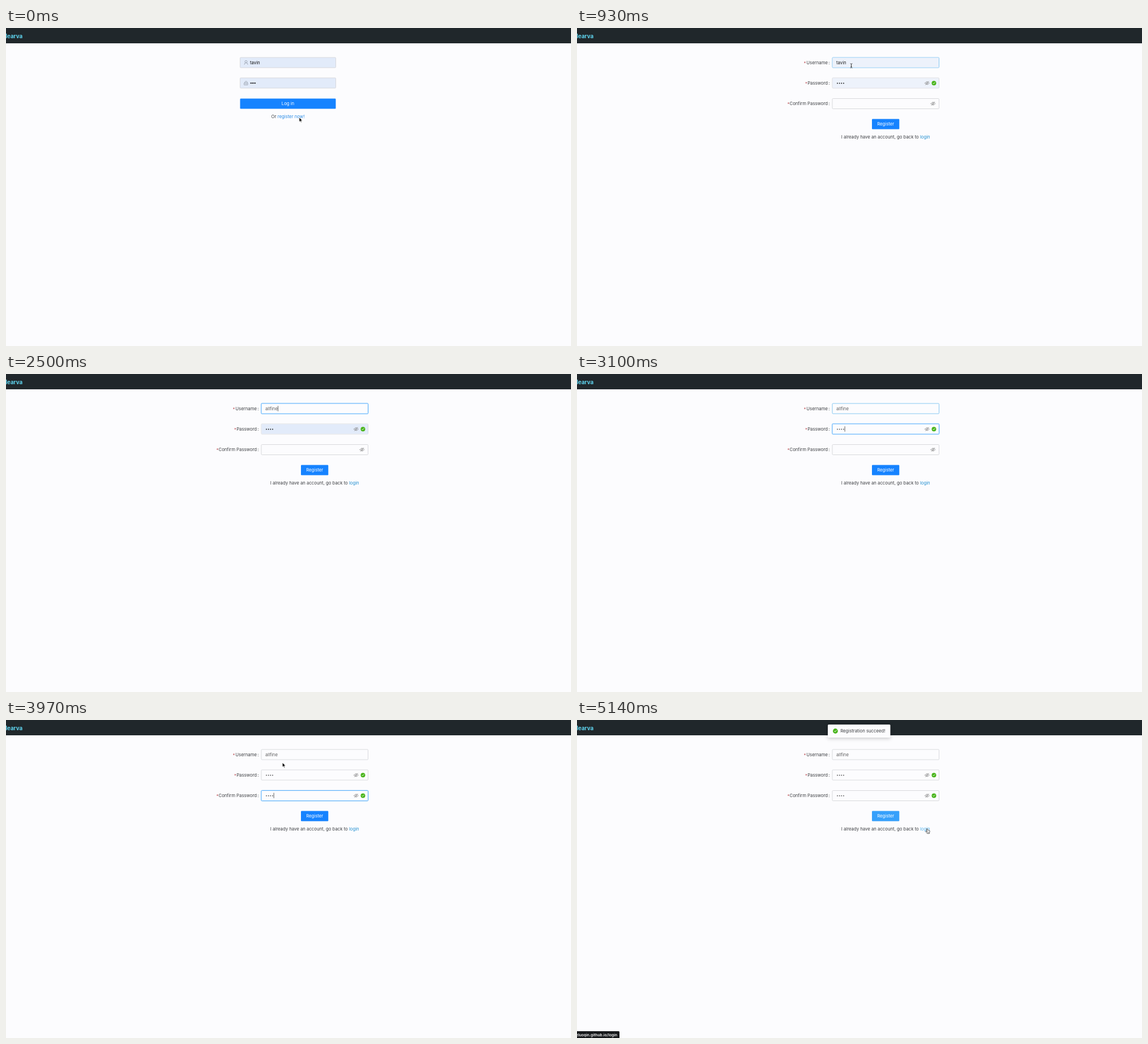
An HTML page for the animation above (5.27 s loop, 998 px wide and 561 px high).

```html
<!DOCTYPE html>
<html lang="en">
<head>
<meta charset="utf-8">
<title>Sign-up demo</title>
<style>
  html, body { margin: 0; width: 100%; height: 100%; overflow: hidden; background: #fcfcfe; }
  svg { display: block; width: 998px; height: 561px; font: 7.75px Inter, Roboto, sans-serif; }
</style>
</head>
<body>
<svg id="stage" viewBox="0 0 998 561"></svg>
<script>
const LOOP = 5270;
const BLUE = '#1683ff', LIGHT_BLUE = '#36a0fb', GREEN = '#48b41a', RED = '#ee1f2d', INK = '#3d3f42';
const AUTOFILL = '#e2ebfa', LINE = '#d0d1d5';
const stage = document.getElementById('stage');
const measure = document.createElement('canvas').getContext('2d');
measure.font = '7.75px Inter, Roboto, sans-serif';

const OLD_USER = 'tavin', NEW_USER = 'allfine';
const PAGE_SWITCH = 680, SELECT = 1400, TYPE_USER = 1850, FOCUS_PASS = 2640, TYPE_PASS = 2760,
      FOCUS_CONFIRM = 3200, TYPE_CONFIRM = 3350, MATCH = 3700, CLICK = 4280;

const clamp = v => Math.max(0, Math.min(1, v));
const progress = (t, from, to) => clamp((t - from) / (to - from));
const ease = p => p * p * (3 - 2 * p);
const typed = (t, start, step, max) => Math.max(0, Math.min(max, Math.floor((t - start) / step) + 1));

const text = (x, y, str, attrs = '') => `<text x="${x}" y="${y}" fill="${INK}" ${attrs}>${str}</text>`;
const box = (x, y, w, h, fill, stroke = 'none', r = 1.3) =>
  `<rect x="${x}" y="${y}" width="${w}" height="${h}" rx="${r}" fill="${fill}" stroke="${stroke}" stroke-width=".8"/>`;
const path = (d, stroke, width = .8, fill = 'none') =>
  `<path d="${d}" fill="${fill}" stroke="${stroke}" stroke-width="${width}" stroke-linejoin="round" stroke-linecap="round"/>`;
const at = (x, y, content, attrs = '') => `<g transform="translate(${x} ${y})" ${attrs}>${content}</g>`;
const dots = (x, y, n, step, r, fill) =>
  Array.from({ length: n }, (_, i) => `<circle cx="${x + i * step}" cy="${y}" r="${r}" fill="${fill}"/>`).join('');
const caret = (x, y) => path(`M${x} ${y - 4.3}V${y + 4.3}`, '#222', .7);

function input(x, y, w, { fill = '#fcfcfe', border = LINE, ring } = {}) {
  const glow = ring ? box(x - .7, y - .7, w + 1.4, 19.4, 'none', ring, 2) : '';
  return glow + box(x, y, w, 18, fill, border);
}

function badge(x, y, ok, scale = 1) {
  const mark = ok ? 'M-1.7 .1L-.5 1.4L1.8-1.4' : 'M-1.3-1.3L1.3 1.3M1.3-1.3L-1.3 1.3';
  return at(x, y, `<g transform="scale(${scale})"><circle r="4" fill="${ok ? GREEN : RED}"/>${path(mark, '#fff')}</g>`);
}

const hiddenEye = (x, y) => at(x, y,
  path('M-3.8 0Q0-5.4 3.8 0Q0 5.4-3.8 0ZM-2.9 3.1L2.9-3.1', '#858585', .75) +
  '<circle r="1.3" fill="none" stroke="#858585" stroke-width=".7"/>');

const cursors = {
  arrow: path('M0 0V7.5L1.8 5.9L3 8.6L4.2 8.1L3 5.4H5.4Z', '#fff', .6, '#000'),
  beam: path('M-1.5-3.6Q0-3.6 0-2.6Q0-3.6 1.5-3.6M0-2.6V2.8M-1.5 3.8Q0 3.8 0 2.8Q0 3.8 1.5 3.8M-.8 1H.8', '#222', .8),
  hand: path('M-1.5-4Q-.6-4.8 0-3.9L.5-1.6L1.5-1.8L2.2-1.3L3.2-1.3L4-.6Q4.5 1.2 3.5 2.8V4.2H-.4L-2.8 1.1Q-3.4 0-2.3-.1L-1 .8Z', '#222', .75, '#fff') +
    path('M.6 1.2V2.8M1.9 1.2V2.8', '#222', .45)
};

function pointer(t) {
  if (t < 100) return at(518, 158, cursors.arrow);
  if (t < PAGE_SWITCH) return at(519, 161, cursors.hand);
  if (t < 1800) {
    const p = ease(progress(t, PAGE_SWITCH, 920));
    return at(519 - 34.5 * p, 161 - 94.5 * p, p > .9 ? cursors.beam : cursors.arrow);
  }
  if (t < 3920) return '';
  if (t < 4500) {
    const p = ease(progress(t, 3920, 4200));
    const kind = p < .08 ? 'beam' : p > .92 ? 'hand' : 'arrow';
    return at(484.5 + 43.5 * p, 66.5 + 102.5 * p, cursors[kind]);
  }
  const p = ease(progress(t, 4500, 4860));
  return at(528 + 91 * p, 169 + 27 * p, p < .15 || p > .9 ? cursors.hand : cursors.arrow);
}

function loginPage(t) {
  return input(413.5, 52, 169, { fill: AUTOFILL }) + input(413.5, 88, 169, { fill: AUTOFILL }) +
    path('M421 64.3Q421 61.4 424 61.4T427 64.3', '#88909c', .7) +
    '<circle cx="424" cy="59.4" r="2" fill="none" stroke="#88909c" stroke-width=".7"/>' +
    path('M421 97H427V100.4H421ZM422 97V95.5Q422 94 424 94T426 95.5V97M424 98.2V99.2', '#88909c', .7) +
    text(431, 64, OLD_USER, 'style="fill:#111"') + dots(432.4, 97.2, 4, 2.55, 1.05, '#111') +
    box(413.5, 124.5, 169, 18, BLUE) +
    text(498, 136.3, 'Log in', 'text-anchor="middle" style="fill:#fff"') +
    text(498, 158.8, `Or <tspan fill="${t > 100 ? LIGHT_BLUE : '#2b8ce6'}">register now!</tspan>`, 'text-anchor="middle"');
}

function label(y, name, starX) {
  return text(443, y, name, 'text-anchor="end"') + text(444.2, y, ':') +
    text(starX, y + .8, '*', 'style="fill:#b84a50"');
}

function userField(t) {
  const focused = t >= 1250 && t < FOCUS_PASS;
  const hovered = t > 880 && t < 3960;
  const count = typed(t, TYPE_USER, 85, NEW_USER.length);
  const value = count ? NEW_USER.slice(0, count) : OLD_USER;
  const selected = t >= SELECT && !count;
  const width = measure.measureText(value).width;
  const filled = progress(t, 760, 1080);
  let out = input(451, 52, 188.5, {
    border: focused ? LIGHT_BLUE : hovered ? '#68b9ee' : LINE,
    ring: focused && '#b9dffb'
  });
  if (!count) out += `<rect x="451.5" y="52.5" width="187.5" height="17" fill="${AUTOFILL}" opacity="${filled}"/>`;
  if (selected) out += box(457.5, 56.4, width + .8, 9.4, '#2874dc', 'none', 0);
  out += text(458, 64, value, `style="fill:${selected ? '#fff' : count ? '#606060' : '#222'}"`);
  if (focused && !selected) out += caret(458 + width + .5, 61);
  return out;
}

function passwordField(t) {
  const focused = t >= FOCUS_PASS && t < FOCUS_CONFIRM;
  const count = typed(t, TYPE_PASS, 95, 4);
  const selected = focused && !count;
  let out = input(451, 88, 188.5, { border: focused ? LIGHT_BLUE : LINE, ring: focused && '#b9dffb' });
  if (!count) out += `<rect x="451.5" y="88.5" width="187.5" height="17" fill="${AUTOFILL}" opacity="${progress(t, 760, 1080)}"/>`;
  if (selected) out += box(457.5, 92.4, 16, 9.4, '#2874dc', 'none', 0);
  out += dots(460, 97.5, count || 4, 3.65, .9, selected ? '#fff' : count ? '#555' : '#111');
  if (focused && count) out += caret(458.5 + count * 3.65, 97);
  return out + hiddenEye(618.5, 97.2) + badge(630.5, 97.2, true, progress(t, 760, 900));
}

function confirmField(t) {
  const focused = t >= FOCUS_CONFIRM && t < CLICK;
  const count = typed(t, TYPE_CONFIRM, 115, 4);
  const wrong = count > 0 && t < MATCH;
  const border = wrong ? '#d9535f' : focused ? LIGHT_BLUE : LINE;
  let out = input(451, 124.5, 188.5, { border, ring: focused && (wrong ? '#f8cbd0' : '#b9dffb') });
  out += dots(460, 133.7, count, 3.65, .9, '#555');
  if (focused) out += caret(458.5 + count * 3.65, 133.2);
  out += hiddenEye(count ? 618.5 : 629, 133.4);
  if (count) out += badge(630.5, 133.4, !wrong, wrong ? progress(t, 3350, 3450) : progress(t, MATCH - 60, MATCH + 100));
  const shown = progress(t, 3465, 3680) * (1 - progress(t, MATCH, MATCH + 170));
  if (shown) out += text(463, 149.7 + 2.6 * shown, 'Two passwords that you enter is inconsistent!',
    `style="fill:#f04a52" opacity="${shown}"`);
  return out;
}

function registerPage(t) {
  const buttonHover = t > 4170;
  const linkHover = t > 4830;
  const shift = t >= MATCH ? 13.5 * (1 - ease(progress(t, MATCH, MATCH + 170))) : 0;
  return label(64, 'Username', 400.6) + label(100, 'Password', 403) + label(136.2, 'Confirm Password', 371.6) +
    userField(t) + passwordField(t) + confirmField(t) +
    at(0, shift,
      box(521, 160.5, 48.3, 18, buttonHover ? LIGHT_BLUE : BLUE) +
      text(545.2, 172.4, 'Register', 'text-anchor="middle" style="fill:#fff"') +
      text(545.2, 194.8, `I already have an account, go back to <tspan fill="${linkHover ? '#55b4ef' : '#218fd0'}">login</tspan>`,
        'text-anchor="middle"'));
}

function toast(t) {
  const p = progress(t, 4310, 4410);
  if (!p) return '';
  const y = 8 - 6.5 * (1 - p);
  return at(443, y,
    '<rect width="110.5" height="23" rx="1.5" fill="#fcfcfe" style="filter:drop-shadow(0 2px 3px #0003)"/>' +
    badge(13.4, 11.5, true, 1.1) + text(22.2, 14.4, 'Registration succeed!'),
    `opacity="${ease(p)}"`);
}

function statusBar(t) {
  const first = progress(t, 160, 260) * (1 - progress(t, 760, 900));
  const opacity = Math.max(first, progress(t, 4860, 4960));
  if (!opacity) return '';
  const page = t < 2000 ? 'register' : 'login';
  const width = page === 'login' ? 75 : 83;
  return `<g opacity="${opacity}">` + box(-3, 549, width + 3, 15, '#17191b', 'none', 1.5) +
    text(width - 4, 557.6, `zluoqin.github.io/${page}`, 'text-anchor="end" font-size="6.7" font-weight="600" style="fill:#f2f2f2"') + '</g>';
}

function render(t) {
  stage.innerHTML =
    '<rect width="998" height="561" fill="#fcfcfe"/><rect width="998" height="27" fill="#20272b"/>' +
    text(29.2, 18.2, 'Nearva', 'text-anchor="end" font-size="9.8" font-weight="700" style="fill:#5fd5f0"') +
    (t < PAGE_SWITCH ? loginPage(t) : registerPage(t)) +
    toast(t) + statusBar(t) + pointer(t);
}

function tick() {
  render(performance.now() % LOOP);
  requestAnimationFrame(tick);
}
tick();
</script>
</body>
</html>
```
